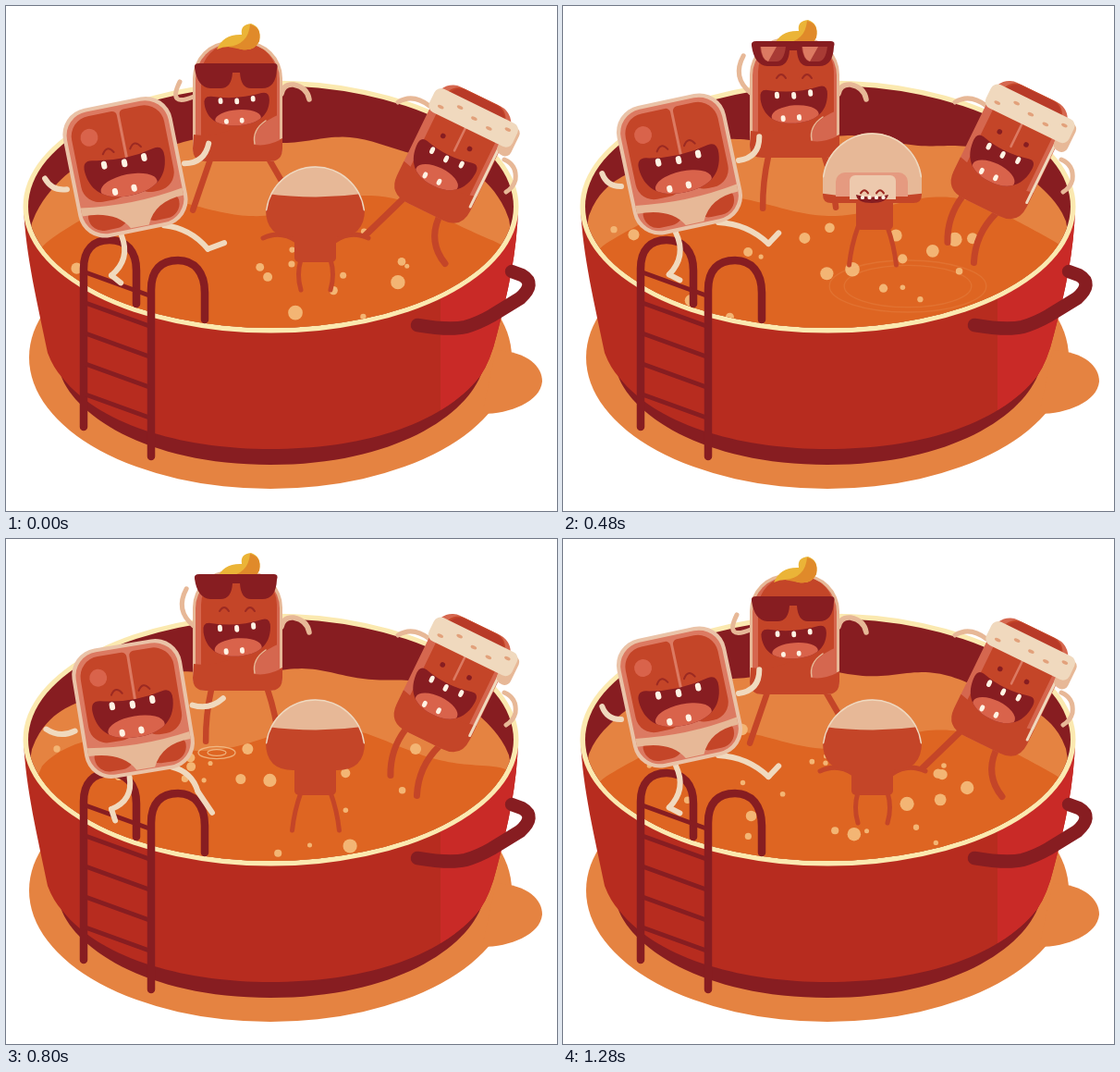
Write an HTML page with a canvas that moves like this. It is 596 px wide and 546 px high and loops after 1360 ms.

```html
<!DOCTYPE html>
<html lang="en">
<head>
<meta charset="utf-8">
<title>Hot pot party</title>
<style>
html, body { margin: 0; width: 100%; height: 100%; overflow: hidden; background: #fff; }
canvas { display: block; width: 596px; height: 546px; }
</style>
</head>
<body>
<canvas id="stage" width="596" height="546"></canvas>
<script>
const ctx = document.getElementById('stage').getContext('2d');
const STEP = 80, FRAMES = 17;
const DARK = '#871d21', RED = '#b72c1f', MEAT = '#c44528', PINK = '#dc7a62', FAT = '#e7b897',
  PALE = '#f0d9be', SOUP = '#e58341', BROTH = '#de6522', BUBBLE = '#f3b574', TONGUE = '#d9634b';

const mix = (a, b, t) => a + (b - a) * t;
const ramp = (n, from, to) => {
  const t = Math.min(1, Math.max(0, (n - from) / (to - from)));
  return t * t * (3 - 2 * t);
};
const bump = (n, mid, reach) => Math.max(0, 1 - ((n - mid) / reach) ** 2) ** 2;

function fill(d, color) {
  ctx.fillStyle = color;
  ctx.fill(new Path2D(d));
}
function line(d, color, width) {
  ctx.strokeStyle = color;
  ctx.lineWidth = width;
  ctx.stroke(new Path2D(d));
}
function oval(x, y, rx, ry, color) {
  ctx.fillStyle = color;
  ctx.beginPath();
  ctx.ellipse(x, y, rx, ry, 0, 0, Math.PI * 2);
  ctx.fill();
}
function box(x, y, w, h, r, color) {
  ctx.fillStyle = color;
  ctx.beginPath();
  ctx.roundRect(x, y, w, h, r);
  ctx.fill();
}
function group(x, y, deg, draw) {
  ctx.save();
  ctx.translate(x, y);
  ctx.rotate(deg * Math.PI / 180);
  draw();
  ctx.restore();
}
function clipped(path, draw) {
  ctx.save();
  ctx.clip(path);
  draw();
  ctx.restore();
}
// Curved limb from a joint; returns its far end
function limb(x, y, deg, len, bow, color, width) {
  const a = deg * Math.PI / 180, dx = Math.cos(a), dy = Math.sin(a);
  const end = [x + len * dx, y + len * dy];
  line(`M${x} ${y}Q${x + dx * len / 2 - bow * dy} ${y + dy * len / 2 + bow * dx} ${end}`, color, width);
  return end;
}

let seed = 23;
const rnd = (lo, hi) => lo + (hi - lo) * (seed = seed * 16807 % 2147483647) / 2147483647;
const bubbles = Array.from({ length: 62 }, (_, i) => ({
  x: i % 7 ? rnd(190, 450) : rnd(55, 200),
  y: rnd(240, 345),
  r: 2.5 + 5.5 * rnd(0, 1) ** 1.6,
  born: rnd(-8, 17),
  life: rnd(4, 10)
}));

const inner = new Path2D();
inner.ellipse(286.5, 217, 262.5, 131, 0, 0, Math.PI * 2);

function pot() {
  oval(286, 380, 261, 142, SOUP);
  fill('M530 372C565 374 580 390 580 406C578 428 545 441 515 441Z', SOUP);
  fill('M58 395C70 440 150 496 286 496C420 496 500 442 515 395Z', DARK);
  const body = 'M19 217C21 270 35 325 45 375Q51 391 61 402C105 457 200 479 286 479C380 479 470 455 513 400' +
    'Q524 384 531 355C543 310 553 265 554 217Z';
  fill(body, RED);
  clipped(new Path2D(body), () => {
    ctx.fillStyle = '#c92a27';
    ctx.fillRect(470, 200, 90, 290);
  });
  line('M445 345Q480 351 497 347Q511 343 525 335L556 316Q574 300 558 291L547 287', DARK, 14.5);
  oval(286.5, 217, 268, 136.5, '#fbe9b0');
  ctx.fillStyle = DARK;
  ctx.fill(inner);
}

function surface(cx, rx, cy, ry, power, swell) {
  let d = `M${cx - rx} ${cy}`;
  for (let x = -rx; x <= rx; x += 4)
    d += `L${cx + x} ${cy - ry * Math.sqrt(1 - Math.abs(x / rx) ** power) + swell(cx + x)}`;
  return d + `L${cx + rx} 360H${cx - rx}Z`;
}
function ring(x, y, rx, alpha) {
  ctx.globalAlpha = Math.max(0, Math.min(1, alpha));
  ctx.beginPath();
  ctx.ellipse(x, y, rx, rx * .33, 0, 0, Math.PI * 2);
  ctx.strokeStyle = '#f6cf9e';
  ctx.lineWidth = 1.3;
  ctx.stroke();
  ctx.globalAlpha = 1;
}
function ripple(age, x, y, speed, life) {
  if (age >= life) return;
  for (const t of [age, age - 1]) if (t > 0) ring(x, y, t * speed, 1 - age / life);
}

function soup(n, dip) {
  const crest = 370 - 33 * n, trough = 290 - 80 * dip;
  clipped(inner, () => {
    fill(surface(286, 262, 254, 110, 3, x => -4 * Math.cos((x - crest) * Math.PI / 70)), SOUP);
    fill(surface(291, 256, 258, 44, 2, x => 13 * Math.cos((x - trough) * Math.PI / 130)), BROTH);
    for (const { x, y, r, born, life } of bubbles) {
      const age = n - born;
      if (age >= 0 && age < life) oval(x, y - r * age, r, r, BUBBLE);
    }
    ripple(n - .7, 373, 303, 16, 6);
    ripple(n - 8, 228, 231, 10, 7);
    ripple(n - 10.5, 228, 327, 8, 4);
  });
}

function ladder() {
  line('M84 455V284C84 263 95 253 112 253C130 253 141 265 141 286V322', DARK, 8.5);
  line('M157 487V307C157 285 168 275 186 275C204 275 215 288 215 310V339', DARK, 8.5);
  for (let i = 0; i < 5; i++) line(`M86 ${288 + 33 * i}l69 25`, DARK, 5);
}

function mouth(x, y, sx, sy, deg = 0) {
  group(x, y, deg, () => {
    ctx.scale(sx, sy);
    const lips = 'M-44 -4Q-45 -17 -34 -15Q0 -7 34 -15Q45 -17 44 -4C42 20 25 30 0 30S-42 20 -44 -4Z';
    fill(lips, DARK);
    clipped(new Path2D(lips), () => oval(0, 20, 31, 13, TONGUE));
    for (let i = -1; i < 2; i++) box(i * 22 - 3, -10 - 2 * i * i, 6, 9, 3, '#fff3e4');
    for (const tx of [-16, 5]) box(tx - 3, 19, 6, 8, 3, '#fff3e4');
  });
}
function eyes(x, y, gap, r = 5) {
  for (const s of [-1, 1])
    line(`M${x + s * gap - r} ${y + r * .6}q${r} ${-r * 1.6} ${2 * r} 0`, '#9c2a22', 2);
}

function steak(d) {
  const x = 126 + 13 * d, y = 171 + 14 * d;
  const part = (px, py, deg, len, bow) => limb(px, py, deg, len, bow, PALE, 6);
  part(x - 63, y + 24, mix(214, 180, d), mix(25, 32, d), -9);
  part(x + 64, y - 4, mix(-49, -8, d), 34, mix(15, 9, d));
  part(...part(x - 4, y + 74, mix(99, 122, d), mix(46, 39, d), -16), mix(27, 77, d), 13, 0);
  part(...part(x + 42, y + 63, mix(23, 46, d), mix(59, 36, d), -11), mix(-47, 68, d), mix(16, 29, d), 0);
  group(x, y, -12 + 3 * d, () => {
    box(-60, -71, 120, 142, 29, '#eac3a8');
    box(-56, -67, 112, 134, 26, PINK);
    box(-51, -62, 53, 94, [22, 5, 20, 20], MEAT);
    box(5, -62, 46, 94, [5, 22, 20, 20], MEAT);
    oval(-32, -39, 9.5, 9.5, TONGUE);
    eyes(0, -22, 15, 6);
    mouth(0, 1, 1, 1);
    for (const s of [-1, 1]) box(s * 28 - 22, 40, 44, 23, [6, 6, 16, 16], MEAT);
    fill('M-56 34Q0 43 56 34V42Q24 42 13 66H-7Q-19 44 -56 43Z', FAT);
  });
}

function sausage(n, w) {
  const bob = -8 * w, lift = ramp(n, 2, 4) - ramp(n, 12, 16);
  limb(222, 163, 109 - 26 * w, 61 - 10 * w, 13 * w * w, MEAT, 6.5);
  limb(283, 163, 60 + 35 * w, 61 - 10 * w, -12 * w * w, MEAT, 6.5);
  limb(203, 98 + bob, mix(227, 259, lift), mix(22, 43, lift) + bob / 2, mix(-29, -17, lift), FAT, 5);
  line('M298 95Q300 84 311 85Q326 88 328 101', FAT, 5.5);
  group(0, bob, 0, () => {
    box(202, 38, 97, 130, [40, 40, 14, 14], FAT);
    box(205, 41, 91, 126, [38, 38, 12, 12], '#d5674f');
    box(211, 41, 82, 112, [34, 34, 8, 8], MEAT);
    fill('M203 139Q230 143 264 124L272 146Q284 150 299 143V154Q299 168 285 168H216Q202 168 202 154Z', MEAT);
    fill('M269 150Q265 130 296 117V145Q282 152 269 150Z', '#d5674f');
    line('M269 149Q266 134 281 124', FAT, 1.5);
    eyes(250, 79, 14);
    mouth(250, 107 - 3 * w, .8 + .05 * w, .74 + .2 * w, -4);
    fill('M228 47Q235 30 255 31Q253 20 265 19Q277 23 274 38Q269 49 255 47Q240 41 228 47Z', '#ebb437');
    fill('M264 20Q277 23 274 38Q269 49 255 47L240 44Q262 42 264 20Z', '#e08a2a');
    group(249, 63 - 20 * lift, 0, () => {
      fill('M-45 4Q-46 -1 -40 -1H41Q46 -1 44 5Q43 26 28 26H16Q5 26 4 9H-4Q-5 26 -17 26H-28Q-42 25 -45 4Z', DARK);
      if (n > 5 && n < 10) for (const x of [-22, 23]) {
        fill(`M${x - 14} 5h28q-2 16 -10 16h-9q-7 -1 -9 -16Z`, '#a83b35');
        fill(`M${x - 13} 5h17l-9 16q-7 -2 -8 -16Z`, PINK);
      }
    });
  });
}

function mushroom(n, w) {
  const u = ramp(n, 0, 3.4) - ramp(n, 8, 10);
  const top = mix(166, 130, u), low = mix(250, 213, u), base = mix(277, 242, u);
  for (const s of [-1, 1]) {
    limb(335 + s * 16, base - 3, 90 - s * 26 * w, 33 + 9 * Math.sin(w * Math.PI), -s * 5 * (1 - w), MEAT, 5);
    if (w < .3) line(`M${335 + s * 21} ${low + 4}Q${335 + s * 38} ${low - 8} ${335 + s * 57} ${low + 1}`, MEAT, 5);
  }
  box(mix(312, 317, u), low - 14, mix(45, 40, u), base - low + 14, 5, MEAT);
  const k = mix(30, 9, u), split = 206;
  const dome = `M281 ${top + 54}A54 54 0 0 1 388 ${top + 54}`;
  const cap = `${dome}V${low - k}Q388 ${low} ${388 - k} ${low}H${281 + k}Q281 ${low} 281 ${low - k}Z`;
  fill(cap, MEAT);
  clipped(new Path2D(cap), () => {
    fill(`M270 100H400V${split - 5}Q335 ${split + 6} 270 ${split - 5}Z`, FAT);
    line(dome, PALE, 3);
    if (u > .2) {
      const y = 208 - 28 * u;
      box(295, y, 78, split - y, [10, 10, 0, 0], '#e59a80');
      box(310, y + 3, 50, split - y, [6, 6, 0, 0], '#edc9ad');
    }
  });
  if (u > .9) {
    eyes(334.5, 200, 8.5, 4);
    fill('M317 204Q334 209 352 204Q350 213 334 213T317 204Z', DARK);
    for (let i = 0; i < 4; i++) box(322 + 7.5 * i, 205, 4, 4, 1.5, '#fff3e4');
    if (w > .6) for (const x of [307, 364]) line(`M${x - 6} 205Q${x} 190 ${x + 6} 205`, PALE, 4);
  }
  if (n > 0 && n < 4) clipped(inner, () => {
    ctx.clip(new Path2D('M0 0H596V546H0ZM281 120H388V215H281Z'), 'evenodd');
    for (const lag of [0, 18]) ring(334, 197, 41 + 34 * n - lag, 1.6 - n * .35);
  });
}

function salami(w) {
  limb(432, 206, 136 - 56 * w, 60 - 16 * w, 18 * w, MEAT, 7);
  limb(468, 229 - 9 * w, 82 + 64 * w, 50 + 16 * w, 15 * (1 - w * w), MEAT, 7);
  line('M458 108Q440 94 424 104', FAT, 5);
  line('M539 166Q553 172 551 188Q549 196 541 201', FAT, 5);
  group(481 - w, 160 - 9 * w, 26, () => {
    box(-42, -70, 88, 138, [20, 20, 24, 24], '#d5674f');
    box(-33, -70, 71, 130, 16, MEAT);
    box(-30, -69, 66, 28, 14, '#b83a28');
    fill('M-42 29Q0 41 46 29V46Q46 68 24 68H-18Q-42 68 -42 46Z', MEAT);
    line('M44 -30V42', PALE, 3);
    line('M2 -33V-5', PINK, 2.5);
    for (const s of [-1, 1]) oval(s * 16, -14, 2.8, 2.8, DARK);
    mouth(-2, 12, .8, .9);
    box(42, -57, 16, 34, 7, FAT);
    box(-45, -60, 100, 28, 8, PALE);
    for (let i = 0; i < 5; i++) oval(-32 + 19 * i, -46 + 5 * Math.cos(i * 2.4), 3.5, 1.8, '#e2a17b');
  });
}

function draw(n) {
  const bob = (1 - Math.cos(n * Math.PI / 4)) / 2;
  const dip = .8 * bump(n, 1.7, 2.5) + bump(n, 10.7, 3);
  ctx.fillStyle = '#fff';
  ctx.fillRect(0, 0, 596, 546);
  ctx.lineCap = ctx.lineJoin = 'round';
  pot();
  soup(n, dip);
  sausage(n, bob);
  salami(bob);
  mushroom(n, bob);
  ladder();
  steak(dip);
}

let last = -1;
function tick() {
  const n = Math.floor(performance.now() / STEP) % FRAMES;
  if (n !== last) draw(last = n);
  requestAnimationFrame(tick);
}
tick();
</script>
</body>
</html>
```
